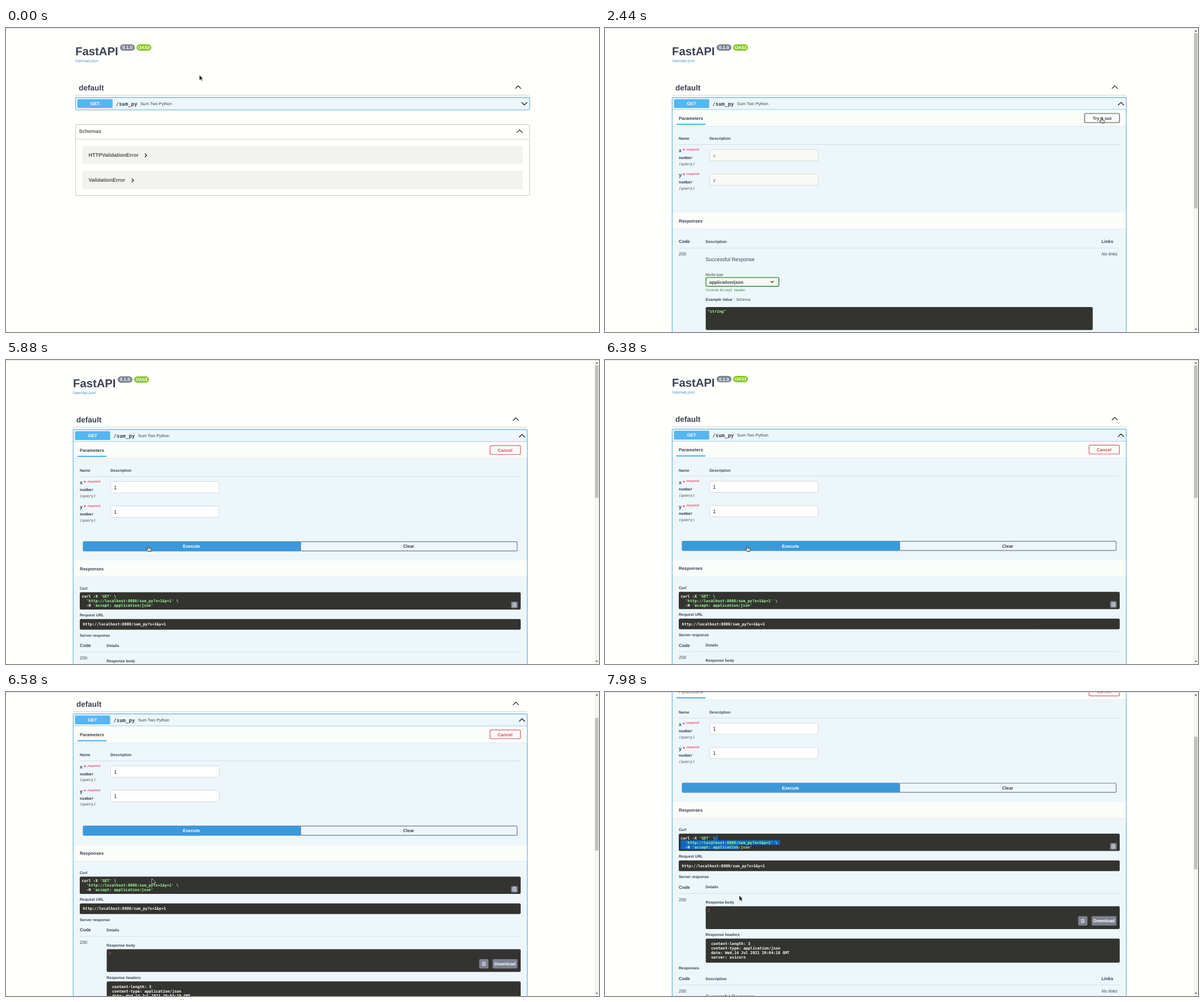
Write an HTML page that moves like this. It is 1045x536 px and loops after 8000 ms.

```html
<!DOCTYPE html>
<html lang="en">
<head>
<meta charset="utf-8">
<title>API docs</title>
<style>
html, body { margin: 0; width: 100%; height: 100%; overflow: hidden; background: #fffffc; }
svg { display: block; width: 1045px; height: 536px; }
text { font-family: "Liberation Sans", Arial, sans-serif; fill: #3b4151; white-space: pre; text-rendering: geometricPrecision; }
.b { font-weight: 700; }
.i { font-style: italic; }
.m { font-family: "DejaVu Sans Mono", monospace; }
.in { font-family: "DejaVu Sans", sans-serif; }
</style>
</head>
<body>
<svg id="stage" viewBox="0 0 1045 536"></svg>
<script>
const LOOP = 8000, CH = 4.07;
const INK = '#3b4151', DARK = '#33332f', BLUE = '#54b6f4', MINT = '#a4f8a0';

// y is the middle of the capital letters
const text = (x, y, size, str, cls = '', fill = INK, anchor = 'start') =>
  `<text x="${x}" y="${(y + size * .358).toFixed(2)}" font-size="${size}" class="${cls}" style="fill:${fill}" text-anchor="${anchor}">${str}</text>`;
const rect = (x1, y1, x2, y2, fill, r = 0, more = '') =>
  `<rect x="${x1}" y="${y1}" width="${x2 - x1}" height="${y2 - y1}" rx="${r}" fill="${fill}" ${more}/>`;
const line = (x1, x2, y, color = '#d3d9dc') => rect(x1, y - .4, x2, y + .4, color);
const group = (id, body, dy = 0) => `<g id="${id}" transform="translate(0 ${dy})">${body}</g>`;
const stroke = (color, w = 1) => `stroke="${color}" stroke-width="${w}"`;
const path = (d, color, w, fill = 'none') =>
  `<path d="${d}" fill="${fill}" ${stroke(color, w)} stroke-linejoin="round" stroke-linecap="round"/>`;
const chevron = (x, y, up, r = 4.7, w = 1.2) => {
  const k = (up ? 1 : -1) * r / 2;
  return path(`M${x - r} ${y + k}L${x} ${y - k}L${x + r} ${y + k}`, '#111', w);
};
const label = (x, y, str) => text(x, y, 6.76, str, 'b');
const strong = (x, y, str, fill, anchor) => text(x, y, 7.89, str, 'b', fill, anchor);
const code = (x, y, str, fill = '#fff') => text(x, y, 6.76, str, 'b m', fill);
const green = s => `<tspan fill="${MINT}">${s}</tspan>`;
const dark = (x1, y1, x2, y2) => rect(x1, y1, x2, y2, DARK, 2.2);
const section = (y, title) =>
  rect(119, y + .5, 918, y + 29.4, '#dfe6e9') + rect(119, y, 918, y + 28.6, '#fbfdfb') + strong(130, y + 14.4, title);
const clip = (x, y, r) => rect(x - r, y - r, x + r, y + r, '#7d8293', 2) +
  path(`M${x + 2.4} ${y - .8}V${y - 2.6}H${x - 2.6}V${y + 3}H${x + 2.4}V${y + 2}M${x + 3.4} ${y + .6}H${x - .8}l1.2 -1.1m-1.2 1.1l1.2 1.1M${x - 1} ${y - 3}h1.8`, '#fff', .8);

const head = () =>
  text(118, 40.3, 20.28, 'FastAPI', 'b') +
  rect(196.8, 28.8, 222.8, 40, '#7d8492', 5.6) + text(209.8, 34.5, 8.2, '0.1.0', 'b', '#fff', 'middle') +
  rect(225.8, 28.8, 252, 40, '#89c823', 5.6) + text(239, 34.5, 7.6, 'OAS3', 'b', '#fff', 'middle') +
  text(118, 57.8, 6.76, '/openapi.json', '', '#4990c9') +
  text(124, 105, 13.52, 'default', 'b') + chevron(898.3, 104.3, true) + line(118, 918, 118.6, '#c4c6c9');

const frame = bottom =>
  rect(118.5, 122.6, 918.5, bottom, 'none', 2.4, stroke('#00000018', 2.6)) +
  rect(118.5, 122.6, 918.5, bottom, '#edf6fb', 2.2, stroke('#6ab9e6', 1.1));

const summary = () =>
  rect(121.6, 125.4, 183.6, 141, BLUE, 1.8) + strong(152.5, 133.3, 'GET', '#fff', 'middle') +
  text(189.3, 133.4, 9.01, '/sum_py', 'b m') + text(232.8, 133.4, 7.32, 'Sum Two Python');

const model = (y, name, ax) =>
  rect(130.2, y, 906.8, y + 32.4, '#f2f2ee', 2) + text(141.4, y + 16.2, 9.01, name, 'b', '#505050') +
  path(`M${ax - 1.3} ${y + 14.2}l2.6 2.6l-2.6 2.6`, '#111', 1.3);

const schemas = () =>
  rect(118.5, 170.4, 918.5, 295.5, 'none', 2.2, stroke('#c4c6c9')) + line(118.5, 918.5, 196, '#c4c6c9') +
  text(124.2, 181.7, 9.01, 'Schemas', 'b', '#606060') + chevron(901, 182, true) +
  model(207.8, 'HTTPValidationError', 242.3) + model(251.8, 'ValidationError', 219.3);

const param = (name, y) =>
  text(130, y, 9.01, name, 'b') + text(137.3, y, 9.01, '*', 'b', '#e8293c') +
  text(143.4, y - 2.3, 5.63, 'required', 'b', '#e5566a') +
  code(130, y + 12.3, 'number', INK) + text(130, y + 23, 6.76, '(query)', 'b i m', '#7c8084') +
  rect(184.5, y - 1.6, 375.6, y + 18.2, '#fff', 2, `id="box-${name}"`) +
  text(190, y + 8.5, 8.5, name, 'in', '#85868a').replace('<text', `<text id="val-${name}"`) +
  rect(191, y + 3.2, 191.8, y + 14.2, '#222', 0, `id="caret-${name}"`);

const params = () => section(144.5, 'Parameters') + rect(126, 168.8, 177, 171.1, BLUE) +
  label(130, 195, 'Name') + label(184, 195, 'Description') + line(130, 907, 205.6) +
  param('x', 216.1) + param('y', 259.1);

const tryButton = () =>
  rect(845, 150.8, 906.8, 166.8, 'none', 2.4, stroke('#00000030', 2.6)) +
  rect(845.3, 151, 906.5, 166.5, '#fbfdfb', 2, stroke('#73767d', 1.2)) + strong(876, 158.8, 'Try it out', INK, 'middle');
const cancelButton = () =>
  rect(853, 150.8, 906.5, 166.5, 'none', 2, stroke('#d95a6c', 1.2)) + strong(879.5, 158.8, 'Cancel', '#d9475c', 'middle');
const executeButton = () =>
  rect(130, 314.4, 907, 334.5, '#3b99da', 2) + strong(518.4, 324.7, 'Execute', '#fff', 'middle');
const buttonPair = () =>
  rect(519, 320.4, 900.8, 336.6, 'none', 2, stroke('#777b84', 1.2)) +
  rect(135.6, 319.8, 519.4, 337.2, '#3b99da', 2, stroke('#00000022', .8)) +
  strong(326.8, 328.5, 'Execute', '#fff', 'middle') + strong(709.5, 328.5, 'Clear', INK, 'middle');

const responses = () =>
  strong(130, 376.6, 'Code') + label(177.3, 376.6, 'Description') + strong(875, 376.6, 'Links') + line(130, 907, 388) +
  text(130, 398.6, 7.89, '200') + text(875, 398.6, 7.89, 'No links', 'i') +
  text(177.3, 408, 9.01, 'Successful Response') + text(177.3, 434.8, 6.4, 'Media type') +
  rect(177.9, 439.9, 306.4, 455.5, '#f6f8f4', 2, stroke('#2d8738', 1.4)) + strong(183.8, 447.7, 'application/json') +
  chevron(294.6, 447.7, false, 2.3, 1.1) +
  text(177.5, 461.9, 6.2, 'Controls', '', '#2b8a36') + text(202.4, 461.9, 6.2, 'Accept', 'm', '#2b8a36') +
  text(227.4, 461.9, 6.2, 'header.', '', '#2b8a36') +
  label(177.3, 479, 'Example Value') + rect(227.6, 474, 228.2, 484, '#b9bec4') + text(231.2, 479, 6.76, 'Schema') +
  dark(177.5, 492, 859.5, 532.5) + code(180.7, 499.5, '"string"', MINT);

const result = () =>
  label(130, 402.7, 'Curl') + dark(130, 409.4, 907, 440) + '<g id="selection"></g>' +
  code(133.4, 417, `curl -X ${green("'GET'")} \\`) +
  code(133.4, 425, `  ${green("'http://localhost:8080/sum_py?x=1&amp;y=1'")} \\`) +
  code(133.4, 433, `  -H ${green("'accept: application/json'")}`) + clip(895.9, 431.8, 5.8) +
  label(130, 449.7, 'Request URL') + dark(130, 456.7, 907, 475.5) +
  code(135.5, 466, 'http://localhost:8080/sum_py?x=1&amp;y=1') +
  label(130, 485.2, 'Server response') + strong(130, 503.5, 'Code') + label(177.3, 503.5, 'Details') +
  line(130, 907, 514.8) + text(130, 525.4, 7.89, '200') +
  label(177.3, 530.4, 'Response body') + dark(177.5, 537.4, 907, 577.6) + text(180.7, 544.6, 6.76, '2', 'm', '#d36363') +
  clip(842, 563.2, 8.2) + rect(857.5, 555, 901.3, 571.4, '#7d8293', 2) + strong(879.3, 563, 'Download', '#fff', 'middle') +
  label(177.3, 587.4, 'Response headers') + dark(177.5, 594.3, 907, 636.8) +
  ['content-length: 3', 'content-type: application/json', 'date: Wed,14 Jul 2021 20:04:18 GMT', 'server: uvicorn']
    .map((s, i) => code(187, 603.6 + i * 8, s)).join('') +
  label(130, 646.7, 'Responses');

const cursors = () =>
  group('arrow', path('M0 0V9.2L2.2 7.3L3.7 10.4L5.3 9.6L3.8 6.7H6.6Z', '#fff', .7, '#111')) +
  group('hand', path('M-.9 .6Q0 -.7 .9 .6V3.8L5 4.7Q5.7 5 5.5 6L4.8 9.6H-.4L-3 6.3Q-3.2 5.2 -2.2 5.2L-.9 6.2Z', '#111', .8, '#fff') +
    path('M1.2 6.6V8.4M2.8 6.6V8.4', '#111', .5)) +
  group('beam', path('M-2 -4.6Q0 -4.6 0 -3.6Q0 -4.6 2 -4.6M0 -3.6V3.6M-2 4.6Q0 4.6 0 3.6Q0 4.6 2 4.6', '#fff', 1.8) +
    path('M-2 -4.6Q0 -4.6 0 -3.6Q0 -4.6 2 -4.6M0 -3.6V3.6M-2 4.6Q0 4.6 0 3.6Q0 4.6 2 4.6', '#222', .8));

const scrollbar = () =>
  rect(1037, 0, 1045, 536, '#f4f4f1') + rect(1038, 9, 1044, 10, '#c1c1be', 0, 'id="thumb"') +
  '<path d="M1039 6.2h4.4l-2.2 -2.6zM1039 530.2h4.4l-2.2 2.6z" fill="#505050"/>';

document.getElementById('stage').innerHTML =
  rect(0, 0, 1045, 536, '#fffffc') +
  group('page', head() +
    group('closed', frame(144.2) + chevron(909.3, 133.4, false) + schemas()) +
    group('open', frame(1300) + chevron(909.3, 133.4, true) + line(119, 918, 144, '#6ab9e6') + params() +
      group('try', tryButton()) + group('cancel', cancelButton()) +
      group('run', executeButton()) + group('pair', buttonPair()) +
      group('bar', section(325.6, 'Responses')) + group('result', result()) + group('table', responses())) +
    summary()) +
  group('scroll', scrollbar()) + rect(0, 0, 1045, 1, '#dededb') + cursors();

const el = {};
document.querySelectorAll('[id]').forEach(e => el[e.id] = e);
const show = (id, on) => el[id].style.display = on ? '' : 'none';
const move = (id, x, y) => el[id].setAttribute('transform', `translate(${x.toFixed(2)} ${y.toFixed(2)})`);
const ramp = (t, a, b) => Math.min(1, Math.max(0, (t - a) / (b - a)));
const smooth = p => p * p * (3 - 2 * p);
const inOut = p => p < .5 ? 4 * p ** 3 : 1 - 4 * (1 - p) ** 3;

const OPEN = 1120, BAR = 1260, TRY = 2560, RUN = 5860;
// start, end, target x, target y
const moves = [
  [300, 700, 146, 131], [1740, 2020, 520, 140], [2120, 2440, 874.6, 158],
  [2580, 2860, 395, 238], [2960, 3240, 235, 225], [4060, 4300, 235.5, 267],
  [5080, 5440, 250.5, 328], [6400, 6560, 257, 329.5], [6720, 6900, 197, 328],
  [7000, 7480, 186, 345], [7580, 7740, 236.5, 359]
];

function pointer(t) {
  let x = 340.8, y = 83;
  for (const [a, b, tx, ty] of moves) {
    const p = smooth(ramp(t, a, b));
    x += (tx - x) * p;
    y += (ty - y) * p;
  }
  return [x, y];
}

function pointerKind(t, x, y) {
  if (t > 6740 && t < 7600) return 'beam';
  if (t > 6400) return 'arrow';
  const inField = x > 184 && x < 376 && (Math.abs(y - 224.5) < 10 || Math.abs(y - 267.5) < 10);
  if (t > TRY && inField) return 'beam';
  const onRow = y > 123 && y < 144;
  const onTry = x > 845 && y > 150 && y < 167;
  return onRow || onTry || y > 314 ? 'hand' : 'arrow';
}

function field(name, t, focusAt, typeAt, blurAt, caretOn) {
  const focus = t >= focusAt && t < blurAt, typed = t >= typeAt;
  const box = el['box-' + name], val = el['val-' + name], caret = el['caret-' + name];
  box.setAttribute('stroke', focus ? '#111' : '#d6d9d8');
  box.setAttribute('stroke-width', focus ? 1.7 : 1);
  box.setAttribute('fill', t < TRY ? '#f9faf7' : '#fff');
  val.textContent = typed ? '1' : name;
  val.style.fill = typed ? '#222' : '#85868a';
  caret.setAttribute('x', typed ? 195.4 : 191);
  show('caret-' + name, focus && caretOn);
}

function select(t, x, y) {
  let out = '';
  if (t >= 7000) {
    const row = Math.min(2, Math.max(0, Math.floor((y - 413) / 8)));
    const col = Math.max(0, Math.round((x - 133.4) / CH));
    [15, 42, 30].forEach((len, i) => {
      if (i > row) return;
      const from = i ? 0 : 15;
      const to = i < row ? len + 1 : Math.min(len, col);
      if (to > from) out += rect(133.4 + from * CH, 413 + i * 8, 133.4 + to * CH, 421 + i * 8, '#0f69c2');
    });
  }
  el.selection.innerHTML = out;
}

function draw(t) {
  const opened = t >= OPEN, bar = t >= BAR, tried = t >= TRY, ran = t >= RUN;
  const scroll = 89.4 * inOut(ramp(t, 6340, 6660)) + 104.5 * inOut(ramp(t, 7800, 8120));
  move('page', bar ? 0 : 4.2, -scroll);
  show('closed', !opened);
  show('open', opened);
  show('try', !tried);
  show('cancel', tried);
  show('run', tried && !ran);
  show('pair', ran);
  show('result', ran);
  move('bar', 0, ran ? 28 : tried ? 20.3 : 0);
  move('table', 0, ran ? 288.2 : tried ? 20.3 : 0);

  show('scroll', bar);
  el.thumb.setAttribute('height', ran ? 234 : tried ? 301.5 : 309);
  el.thumb.setAttribute('y', 9 + scroll * .437);

  field('x', t, 3320, 3980, 4340, true);
  field('y', t, 4340, 5020, 5720, t < 4840 || t >= 5020);

  const [x, y] = pointer(t);
  const kind = pointerKind(t, x, y);
  for (const id of ['arrow', 'hand', 'beam']) show(id, id === kind);
  move(kind, x, y);
  select(t, x, y + scroll);
}

const start = performance.now();
function tick() {
  draw((performance.now() - start) % LOOP);
  requestAnimationFrame(tick);
}
draw(0);
requestAnimationFrame(tick);
</script>
</body>
</html>
```
